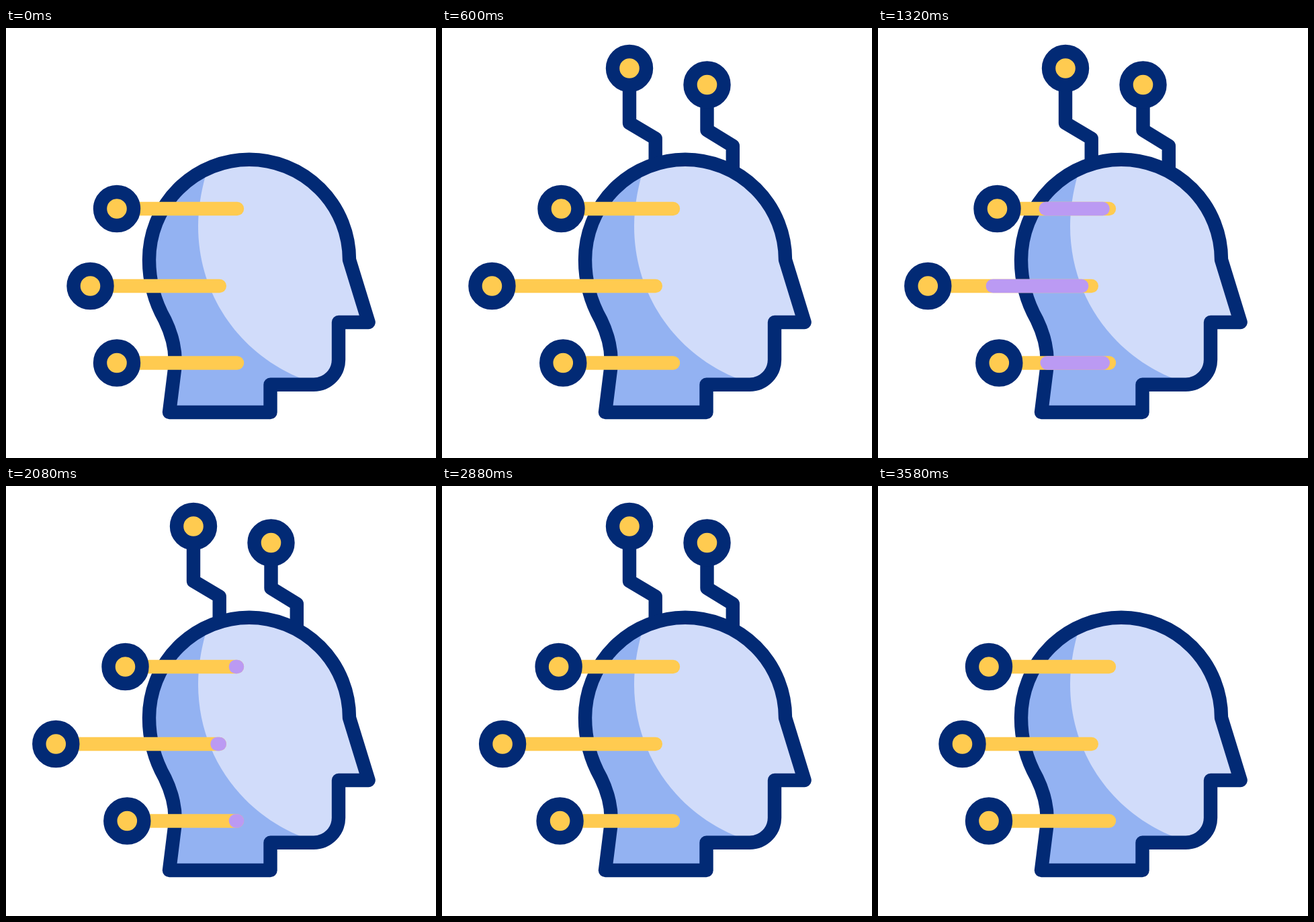
An HTML page that plays this animation: 640 by 640 pixels, repeating every 3.6 s.

```html
<!DOCTYPE html>
<html lang="en">
<head>
<meta charset="utf-8">
<title>Connected mind</title>
<style>
  html, body { margin: 0; width: 100%; height: 100%; overflow: hidden; background: #fff; }
  svg { display: block; width: 100vw; height: 100vh; }
  .ink, .wire, .pulse { fill: none; stroke-width: 20.4; stroke-linecap: round; stroke-linejoin: round; }
  .ink { stroke: #022a75; }
  .wire { stroke: #ffcb50; }
  .pulse { stroke: #bb9af3; }
  .node { fill: #ffcb50; stroke: #022a75; stroke-width: 20.4; }
</style>
</head>
<body>
<svg viewBox="0 0 640 640">
  <defs>
    <path id="head" d="M213 345A149 149.3 0 0 1 511 345L539.6 438H495V493.500A37 37 0 0 1 458 530.700H393.500V572H243L251 508C254 483 247 456 236.500 434.500C221 407 213 376 213 345Z"/>
    <clipPath id="inside"><use href="#head"/></clipPath>
  </defs>
  <g id="antennas">
    <path class="ink" d="M279 60V141.500L317.700 164.500V230"/>
    <circle class="node" cx="279" cy="60" r="25"/>
    <path class="ink" d="M394.500 84.500V152L432.800 175.500V245"/>
    <circle class="node" cx="394.500" cy="84.500" r="25"/>
  </g>
  <use href="#head" fill="#93b2f2"/>
  <path clip-path="url(#inside)" fill="#d1dcfa" d="M303 200C291 236 286 267 286 295C286 400 350 486 440 522L560 540V180Z"/>
  <use href="#head" class="ink"/>
  <g id="wires"></g>
</svg>
<script>
const LOOP = 3600;
const NS = "http://www.w3.org/2000/svg";

// Tracks: [time, value], eased in and out between neighbours.
const RISE = [[30, 210], [400, -11], [560, 0], [3150, 0], [3300, -11], [3585, 210]];
const SPREAD = [[20, 0], [620, 1], [2600, 1], [3360, 0]];
const TAIL = [[1080, 0], [1720, 0.987], [2070, 0.987], [2440, 0]];
const TIP = [[640, 0], [1450, 1], [2200, 1], [2590, 0]];

const ease = p => p * p * (3 - 2 * p);
const mix = (a, b, p) => a + (b - a) * p;

function at(track, t) {
  const i = track.findIndex(key => key[0] > t);
  if (i === 0) return track[0][1];
  if (i < 0) return track[track.length - 1][1];
  const [t0, a] = track[i - 1], [t1, b] = track[i];
  return mix(a, b, ease((t - t0) / (t1 - t0)));
}

function add(tag, attrs) {
  const el = document.createElementNS(NS, tag);
  for (const name in attrs) el.setAttribute(name, attrs[name]);
  return document.getElementById("wires").appendChild(el);
}

const wires = [
  { y: 269, near: 165, far: 177.5, end: 344 },
  { y: 384, near: 125.5, far: 74.3, end: 317.8 },
  { y: 498.5, near: 165, far: 180.3, end: 344 }
].map(w => ({
  ...w,
  line: add("line", { class: "wire", x2: w.end, y1: w.y, y2: w.y }),
  pulse: add("line", { class: "pulse", y1: w.y, y2: w.y }),
  node: add("circle", { class: "node", cy: w.y, r: 25 })
}));

const antennas = document.getElementById("antennas");

function draw(t) {
  antennas.setAttribute("transform", `translate(0 ${at(RISE, t)})`);
  const spread = at(SPREAD, t), tail = at(TAIL, t), tip = at(TIP, t);
  for (const w of wires) {
    const x = mix(w.near, w.far, spread);
    w.node.setAttribute("cx", x);
    w.line.setAttribute("x1", x);
    w.pulse.setAttribute("visibility", tip > tail ? "visible" : "hidden");
    w.pulse.setAttribute("x1", mix(w.far + 29, w.end, tail));
    w.pulse.setAttribute("x2", mix(w.far + 29, w.end, tip));
  }
}

const start = performance.now();
function tick() {
  draw((performance.now() - start) % LOOP);
  requestAnimationFrame(tick);
}
tick();
</script>
</body>
</html>
```
